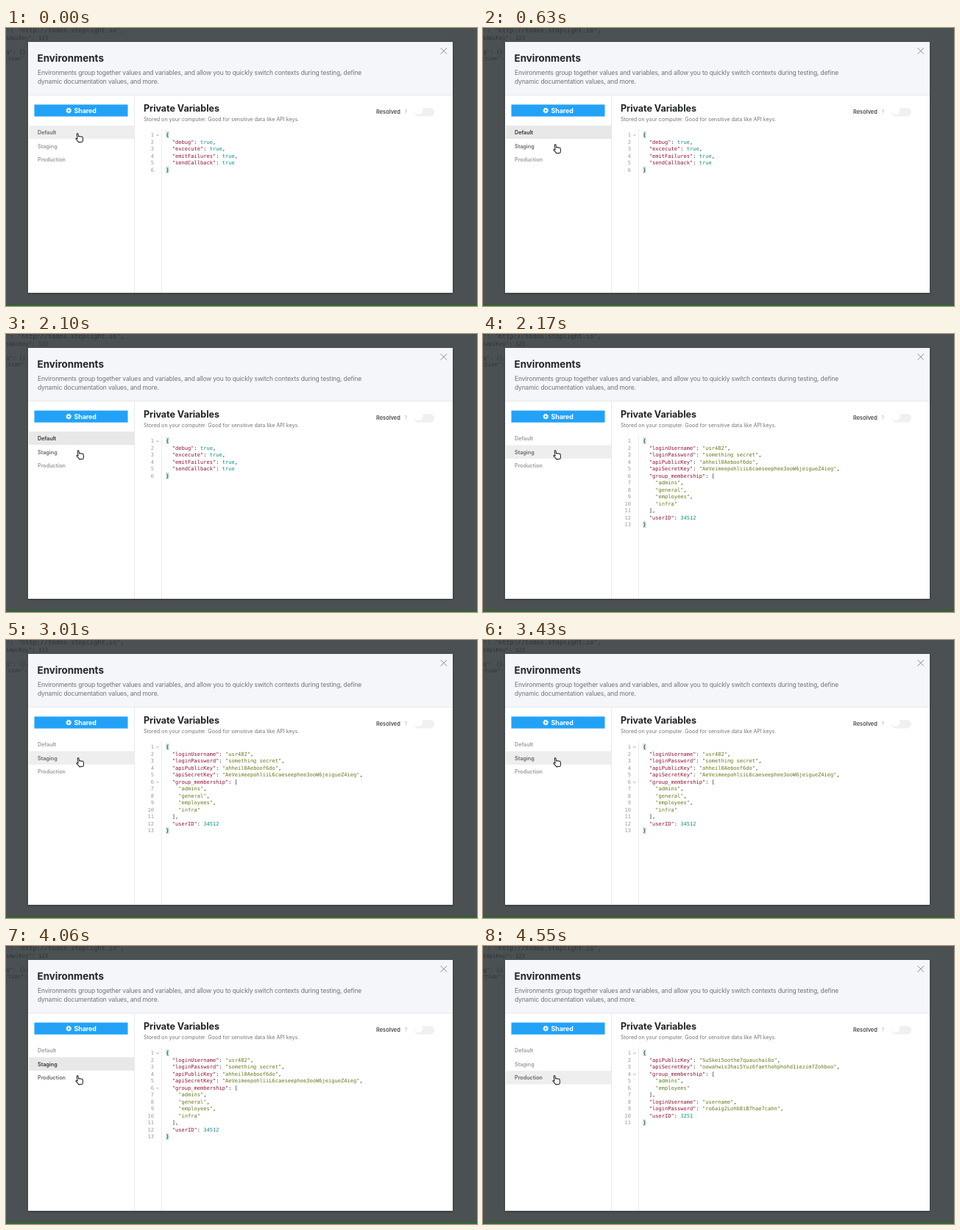
These frames come from a looping animation (640 px wide and 379 px high, 4.62 s). An HTML page:

```html
<!DOCTYPE html>
<html lang="en">
<head>
<meta charset="utf-8">
<title>Environments</title>
<style>
  html, body { margin: 0; width: 100%; height: 100%; overflow: hidden; background: #4b5052; }
  svg { display: block; width: 100%; height: 100%; }
  text { font-family: Inter, "Open Sans", sans-serif; white-space: pre; }
  .mono text { font-family: "DejaVu Sans Mono", monospace; font-size: 7.06px; }
  .backdrop text { font-size: 7.3px; fill: #2f3336; }
  .backdrop .address { font-size: 8.6px; }
  .modal { filter: drop-shadow(0 1px 1.5px rgba(0, 0, 0, .3)); }
  .title { font-weight: 700; fill: #222529; }
  .intro { font-size: 8.5px; letter-spacing: -.142px; fill: #6f7278; }
  .item { font-size: 7.2px; font-weight: 600; }
  .number { fill: #999; text-anchor: end; }
  .key { fill: #8c1030; }
  .string { fill: #63791a; }
  .atom { fill: #138a8a; }
  .fold, .line { fill: none; }
</style>
</head>
<body>
<svg viewBox="0 0 640 379" preserveAspectRatio="none">
  <rect width="640" height="379" fill="#4b5052"/>
  <g class="mono backdrop">
    <text class="address" x="-5" y="6">s": "http://todos.stoplight.io",</text>
    <text x="0" y="15.5">sApiKey": 123</text>
    <text x="-4" y="34.8">ug": {},</text>
    <text x="-2" y="44.2">ction": "",</text>
  </g>
  <rect y="378" width="640" height="1" fill="#0a860a"/>

  <rect class="modal" x="30" y="19" width="577" height="342" fill="#fff"/>
  <rect x="30" y="19" width="577" height="72" fill="#f5f6f9"/>
  <path class="line" d="M30 91.5H607M174.5 92V361" stroke="#e8e9ec"/>
  <text class="title" x="42.5" y="45.5" font-size="13.4">Environments</text>
  <text class="intro" x="43" y="63.5">Environments group together values and variables, and allow you to quickly switch contexts during testing, define</text>
  <text class="intro" x="43" y="75.5">dynamic documentation values, and more.</text>
  <path class="line" d="M590.5 27l8.5 8.5m0-8.5l-8.5 8.5" stroke="#8b8f95"/>

  <rect x="38.5" y="104.4" width="127" height="16.2" fill="#22a2f7"/>
  <circle cx="85.2" cy="112.5" r="2.1" fill="none" stroke="#fff" stroke-width="1.7"/>
  <circle cx="85.2" cy="112.5" r="3.3" fill="none" stroke="#fff" stroke-width="1.2" stroke-dasharray="1.3 1.29"/>
  <text x="92.4" y="115.7" font-size="8.8" font-weight="700" fill="#fff">Shared</text>
  <g id="sidebar"></g>

  <text class="title" x="187" y="113.5" font-size="12.6" letter-spacing="-.08">Private Variables</text>
  <text x="187" y="126.5" font-size="7.2" letter-spacing="-.04" fill="#777">Stored on your computer. Good for sensitive data like API keys.</text>
  <text x="503" y="117" font-size="7.4" font-weight="600" fill="#4a4d52">Resolved</text>
  <text x="541.5" y="117" font-size="7" fill="#aaa">?</text>
  <rect x="555" y="109" width="27" height="11.5" rx="5.75" fill="#f0f0f0"/>
  <circle cx="560.5" cy="112" r="6" fill="#fff"/>

  <path class="line" d="M211.5 138V361" stroke="#ebebeb"/>
  <g id="editors" class="mono"></g>

  <path id="cursor" fill="#fff" stroke="#222" stroke-width=".9" stroke-linejoin="round"
    d="M-2.2 1.4V-4.2Q-2.2-5-1.4-5T-.6-4.2V-1.2Q.3-1.8 1-.9Q1.9-1.4 2.5-.5Q4-.8 4.1 .7V2.5Q4 4 3.2 5.6H-1.2Q-2 4-3.6 2Q-4.4 .8-3.7 .4T-2.2 1.4Z"/>
</svg>
<script>
const LOOP = 4620, ROW = 18.6, LINE = 9.54, CHAR = 4.25;
const CODE_X = 217.3, CODE_Y = 148;

const environments = [
  { name: "Default", from: 0, foldsFrom: 0,
    values: { debug: true, excecute: true, emitFailures: true, sendCallback: true } },
  { name: "Staging", from: 2170, foldsFrom: 2310,
    values: {
      loginUsername: "usr482",
      loginPassword: "something secret",
      apiPublicKey: "ahheil0Aeboof6do",
      apiSecretKey: "AeVeimeepohliiL6caeseephee3ooW6jeigueZ4ieg",
      group_membership: ["admins", "general", "employees", "infra"],
      userID: 34512
    } },
  { name: "Production", from: 4200, foldsFrom: 4340,
    values: {
      apiPublicKey: "Su5kei5oothe7quauchai6o",
      apiSecretKey: "oowahwis3hai5Yuz6faethohphohd1iezim7Zohboo",
      group_membership: ["admins", "employees"],
      loginUsername: "username",
      loginPassword: "ro6aig2Lohb8iB7hae7cahn",
      userID: 3251
    } }
];

// time, x, y of the pointer
const pointerPath = [
  [0, 99, 149], [210, 99, 149], [490, 100, 164], [2800, 100, 164],
  [3010, 100, 166], [3780, 100, 166], [3990, 99, 182], [LOOP, 99, 182]
];

const byId = id => document.getElementById(id);

function add(parent, tag, attributes, content = "") {
  const node = document.createElementNS("http://www.w3.org/2000/svg", tag);
  for (const name in attributes) node.setAttribute(name, attributes[name]);
  node.textContent = content;
  return parent.appendChild(node);
}

function tokenClass(token, rest) {
  if (token[0] === '"') return rest[0] === ":" ? "key" : "string";
  return /^\w/.test(token) ? "atom" : "plain";
}

function buildEditor(values) {
  const group = add(byId("editors"), "g", {});
  const folds = add(group, "g", {});
  const lines = JSON.stringify(values, null, 2).split("\n");
  lines.forEach((line, i) => {
    const y = CODE_Y + i * LINE;
    if (i === 0 || i === lines.length - 1)
      add(group, "rect", { x: CODE_X - .2, y: y - 7, width: CHAR + .4, height: 9, fill: "#cfe8dc" });
    add(group, "text", { x: 201, y, class: "number" }, i + 1);
    if (/[{[]$/.test(line))
      add(folds, "path", { class: "fold", d: `M204.2 ${y - 2.6}l1.7 1.6 1.7-1.6`, stroke: "#999", "stroke-width": .8 });
    const text = add(group, "text", { x: CODE_X, y, fill: "#222" });
    for (const match of line.matchAll(/"[^"]*"|\w+|[^\w"]+/g)) {
      const rest = line.slice(match.index + match[0].length);
      add(text, "tspan", { class: tokenClass(match[0], rest) }, match[0]);
    }
  });
  return { group, folds };
}

const views = environments.map(({ name, values }, i) => {
  const top = 133 + i * ROW;
  return {
    top,
    row: add(byId("sidebar"), "rect", { x: 31, y: top, width: 143, height: 18.3 }),
    label: add(byId("sidebar"), "text", { class: "item", x: 43, y: top + 12.2 }, name),
    ...buildEditor(values)
  };
});

function pointerAt(t) {
  const next = pointerPath.findIndex(stop => stop[0] > t);
  const [t0, x0, y0] = pointerPath[next - 1], [t1, x1, y1] = pointerPath[next];
  const p = (t - t0) / (t1 - t0), eased = p * p * (3 - 2 * p);
  return [x0 + (x1 - x0) * eased, y0 + (y1 - y0) * eased];
}

function draw(now) {
  const t = now % LOOP;
  const [x, y] = pointerAt(t);
  byId("cursor").setAttribute("transform", `translate(${x + .4} ${y + .3}) scale(1.15) rotate(-8)`);
  const active = environments.findLastIndex(e => t >= e.from);
  const hovered = Math.floor((y - 5 - views[0].top) / ROW);

  views.forEach(({ row, label, group, folds }, i) => {
    const isActive = i === active, isHovered = i === hovered;
    row.setAttribute("fill", !isActive ? "#fff" : isHovered ? "#eee" : "#e8e8e8");
    label.setAttribute("fill", isHovered ? "#666" : isActive ? "#333" : "#999");
    group.setAttribute("display", isActive ? "inline" : "none");
    folds.setAttribute("display", t >= environments[i].foldsFrom ? "inline" : "none");
  });
}

const start = performance.now();
function tick() {
  draw(performance.now() - start);
  requestAnimationFrame(tick);
}
tick();
</script>
</body>
</html>
```
